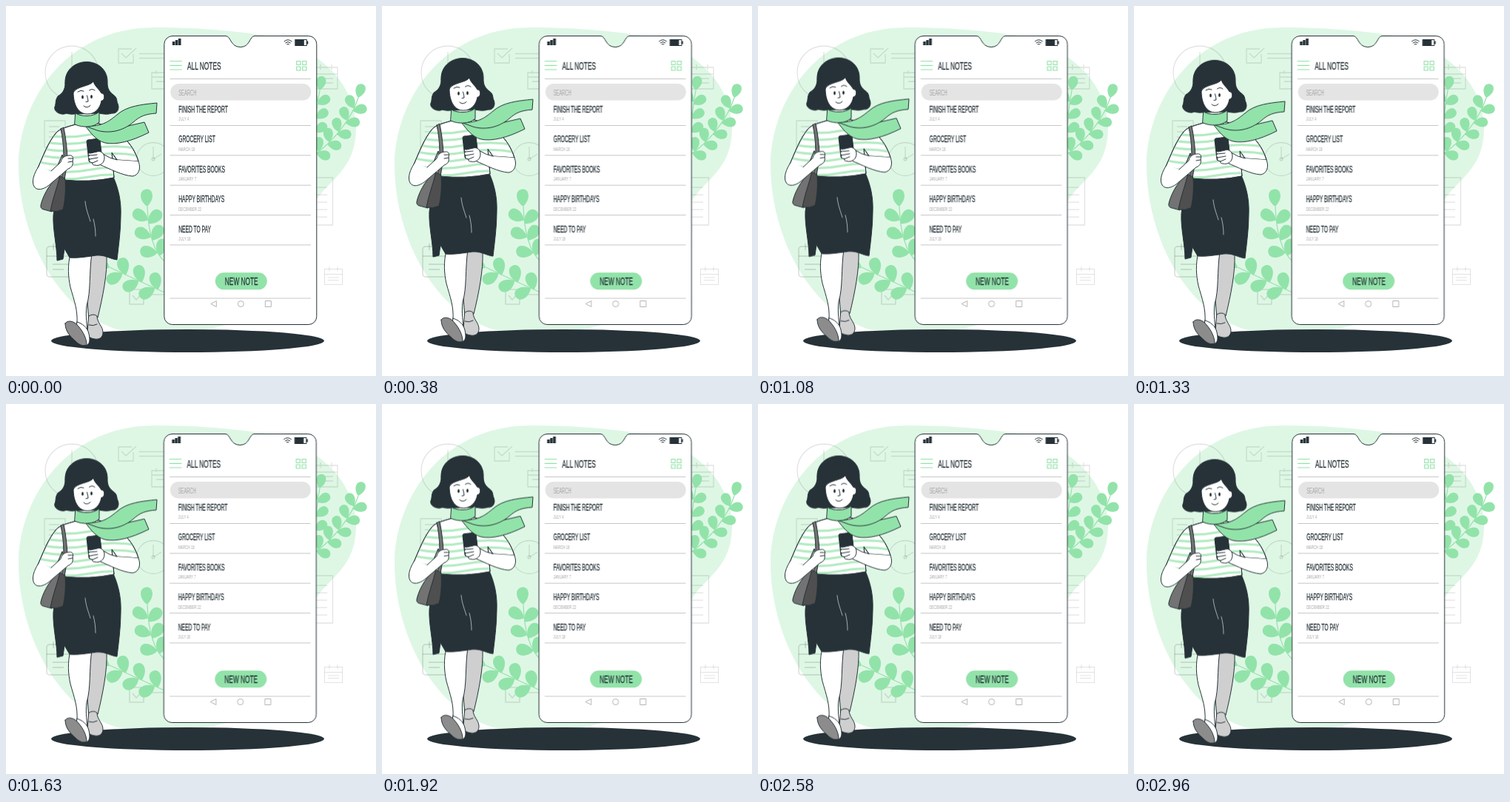
Write an HTML page that moves like this. It is 500 px wide and 500 px high and loops after 3000 ms.

```html
<!DOCTYPE html>
<html lang="en">
<head>
<meta charset="utf-8">
<title>All notes</title>
<style>
html, body { margin: 0; width: 100%; height: 100%; overflow: hidden; background: #fff; }
svg { display: block; width: 100%; height: 100%; }
.icons { fill: none; stroke: #000; stroke-opacity: .11; stroke-width: 1.3; }
.ink { stroke: #263238; stroke-width: 1; stroke-linejoin: round; stroke-linecap: round; fill: #fff; }
.dark { fill: #263238; }
.green { fill: #92e3a9; }
.line { fill: none; }
.stem { fill: none; stroke: #92e3a9; stroke-width: 1.2; }
.rule { stroke: #c7c7c7; }
.labels { font-family: "Liberation Sans", Arial, sans-serif; fill: #263238; stroke: #263238; stroke-width: .3; }
.title { font-size: 12.4px; }
.big { font-size: 15.4px; }
.date { font-size: 8.1px; }
.hint { font-size: 10.8px; }
.date, .hint { fill: #a6a6a6; stroke: none; }
#phone { animation: sway 1.5s linear infinite; }
#woman { animation: bob 1.5s linear infinite; }
@keyframes sway { 50% { transform: translateX(-3px); } }
@keyframes bob { 50% { transform: translateY(-9.7px); } }
</style>
</head>
<body>
<svg viewBox="0 0 500 500">
  <defs>
    <path id="leaf" d="M0 0C-5-3-10-11-8-18C-6-25 5-26 7-18C9-11 4-4 0 0Z"/>
    <path id="shirt" d="M94 160C84 163 74 165 68 171C57 184 50 203 43 219L66 225L76 201L78 235Q112 239 146 232L143 198L150 208L179 210C175 197 168 186 160 179C150 171 140 165 126 159Z"/>
    <clipPath id="cloth"><use href="#shirt"/></clipPath>
  </defs>

  <path fill="#def7e5" d="M17 215C17 135 75 30 200 29C260 29 300 33 345 39C405 48 473 95 473 165C473 225 432 235 415 270C390 330 390 400 320 425C270 440 205 450 150 437C65 410 17 305 17 215Z"/>

  <g class="icons">
    <circle cx="89" cy="90" r="36"/>
    <path d="M89 62V90"/>
    <path d="M172 65V77H152V58H170M156 64L162 70L176 57M180 64.500H214M180 70.500H214"/>
    <path d="M214 90H197V112H214M197 96H214M203 87V92M203 102H214"/>
    <path d="M418 83H448V112H418M418 92H448M425 79V86M440 79V86M424 98H442M424 104H442"/>
    <path d="M52 155H80V191H52ZM58 163H72M58 170H68M58 177H72"/>
    <circle cx="199" cy="207" r="22.500"/>
    <circle cx="199" cy="207" r="2"/>
    <path d="M199 190V207L210 200"/>
    <rect x="55" y="325" width="45" height="41" rx="4" stroke-width="2"/>
    <path stroke-width="2" d="M55 338H100M64 321V330M76 321V330M63 349H84M63 356H78"/>
    <path stroke-width="1.700" d="M186 391V403H167V383H184M171 391L176 397L190 382M190 390H214"/>
    <path d="M418 232H441.500V296H418"/>
    <path stroke-dasharray="1.300 8.700" stroke-width="16" d="M426 244.500V290"/>
    <path stroke-width="1" d="M430.500 355.500H454.500V376.500H430.500ZM430.500 362.500H454.500M437 352V358.500M448 352V358.500M435 367H450M435 370.500H450"/>
  </g>

  <ellipse class="dark" cx="245.500" cy="452.500" rx="184.500" ry="15.500"/>

  <g id="plants" class="green"></g>

  <g id="phone">
    <path class="ink" d="M224.800 40.500H297C304 40.500 303 55.500 316.800 55.500C330 55.500 329 40.500 336 40.500H408.800A11 11 0 0 1 419.800 51.500V419.500A11 11 0 0 1 408.800 430.500H224.800A11 11 0 0 1 213.800 419.500V51.500A11 11 0 0 1 224.800 40.500Z"/>
    <path class="dark" d="M224.800 48H228.300V53H224.800ZM228.800 46H232.300V53H228.800ZM232.800 44H236.500V53H232.800Z"/>
    <g fill="none" stroke="#263238">
      <path d="M375.800 48Q381 43.500 386.300 48M377.500 50Q381 47 384.600 50M379.300 52Q381 50.500 382.800 52"/>
      <rect x="390.800" y="45.500" width="15.500" height="8"/>
    </g>
    <path class="dark" d="M391 46H402.800V53H391ZM406 47.500H408.300V51.500H406Z"/>
    <g class="line" stroke="#92e3a9" stroke-width="1.200">
      <path d="M221.300 74.500H237.800M221.300 80.300H237.800M221.300 86H237.800"/>
      <path d="M392.800 74.500h5v5h-5zm8 0h5v5h-5zm-8 7.500h5v5h-5zm8 0h5v5h-5z"/>
    </g>
    <rect x="222.300" y="105" width="190" height="22.500" rx="11.250" fill="#e4e4e4"/>
    <rect class="green" x="282.800" y="360.300" width="70" height="23" rx="11.500"/>
    <g class="line" stroke="#b4b4b4">
      <path d="M276.800 402.500L284.300 398.500V406.500ZM350.300 398.500h8v8h-8z"/>
      <circle cx="317.300" cy="402.500" r="4"/>
    </g>
    <g id="rules" class="rule"></g>
    <g class="labels" transform="translate(233.200 0) scale(.54 1)">
      <text class="big" x="22" y="86">ALL NOTES</text>
      <text class="hint" y="121">SEARCH</text>
      <g id="notes"></g>
      <text class="big" x="116" y="377.500">NEW NOTE</text>
    </g>
  </g>

  <g id="woman" class="ink">
    <!-- legs and shoes -->
    <path fill="#cfcfcf" d="M112 334L136 337C137 362 131 392 124 421H112C109 400 109 370 112 334Z"/>
    <path fill="#cfcfcf" d="M112 419Q118 415 123 419C123 428 131 433 131 441C131 448 126 451 120 450C114 449 110 447 110 442Z"/>
    <path class="line" d="M112 431Q118 433 123 430"/>
    <path d="M87 334C83 352 84 366 87 380C92 398 97 410 96 429L110 443C110 432 107 420 109 405C115 385 112 362 116 334Z"/>
    <path d="M96 427C103 429 110 434 112 443C114 452 113 457 108 459L96 440Z"/>
    <path fill="#8c8c8c" d="M80 429C83 424 92 425 98 433C105 441 109 450 109 458C104 460 99 458 94 453C86 446 80 439 80 429Z"/>

    <!-- skirt -->
    <path class="dark" d="M78 233Q112 238 145 231C152 247 156 264 155 284C155 304 152 325 150 343C141 342 134 336 122 337C109 339 95 341 86 340L79 328L77 342L69 344C69 325 63 302 64 283C66 262 73 249 78 233Z"/>
    <path class="line" stroke="#fff" stroke-width=".6" d="M107 264C108 275 112 284 114 291M118 288C120 295 121 303 121 311"/>

    <!-- shirt -->
    <use href="#shirt"/>
    <path id="stripes" class="line" clip-path="url(#cloth)" stroke="#b2ebc1" stroke-width="3.200"/>
    <use href="#shirt" fill="none"/>

    <!-- bag -->
    <path fill="#737373" d="M74 166L78 164C81 180 83 195 83 210L79 235H75C79 210 79 190 74 166Z"/>
    <path fill="#737373" d="M73 229C63 235 51 252 47 269Q46 274 51 275L62 278L74 244Z"/>
    <path fill="#4f4f4f" d="M73 229L80 234C81 249 80 263 77 275Q69 279 60 277C63 260 69 246 73 229Z"/>

    <!-- left arm -->
    <path d="M44 217C38 226 34 237 38 244C42 250 50 248 57 243L84 220C90 218 91 213 90 209C92 204 89 201 85 202C80 202 75 205 74 211L61 223"/>
    <path class="line" d="M84 206L90 206M84 211L90 210"/>

    <!-- right arm with handset -->
    <path d="M179 210C183 220 179 229 171 230C157 229 140 220 126 214L131 200Q140 206 150 208"/>
    <path class="dark" d="M111 181L125 179Q127 179 127 181L130 207Q130 209 128 209L114 211Q112 211 112 209L109 183Q109 181 111 181Z"/>
    <path d="M112 202Q110 198 114 199L123 197C128 195 133 199 133 205C133 212 127 217 120 215Q116 215 117 212Q111 211 113 207Q110 205 112 202Z"/>
    <path class="line" d="M112 202L123 201M113 207L124 205M117 212L124 209"/>

    <!-- head -->
    <path class="dark" d="M80 104C79 87 93 75.500 109 75.500C125 75.500 138 87 137 104C137 112 140 116 145 120C151 124 149 128 151 132C154 139 150 146 143 145C137 147 131 146 126 145L92 146C85 147 82 144 79 146C72 147 64 142 66 136C68 132 66 128 70 122C76 118 80 114 80 104Z"/>
    <path d="M91 117C95 108 113 109 118 102C120 109 126 112 129 118C134 117 134 128 129 128C127 139 120 146 110 146C98 146 91 134 91 117Z"/>
    <g class="dark" stroke="none">
      <ellipse cx="103.500" cy="123" rx="1.400" ry="2.500"/>
      <ellipse cx="115.500" cy="122.500" rx="1.400" ry="2.500"/>
    </g>
    <path class="line" d="M97 116Q101 113 105 115M112.500 114Q116 111 120 114M109.500 121Q111 126 111 129L108 129.500M105 135Q109 139 114 134.500"/>

    <!-- scarf -->
    <path class="green" d="M107 162C121 166 145 169 161 163L187 157L193 171C169 183 149 188 134 185C122 182 115 172 107 162Z"/>
    <path class="green" d="M107 162C131 164 141 154 150 147C163 135 184 133 204 131L203 145C188 146 181 149 172 157C158 169 139 173 123 168Z"/>
    <path class="green" d="M94 145C102 150 118 150 126 143L126 157C119 164 104 165 93 160Z"/>
  </g>
</svg>
<script>
const el = id => document.getElementById(id);
const svgTag = (name, attrs) => {
  const node = document.createElementNS("http://www.w3.org/2000/svg", name);
  for (const key in attrs) node.setAttribute(key, attrs[key]);
  return el("plants").appendChild(node);
};

// Leaves sit in pairs at equal steps down from the tip, splayed from the stem.
function plant(d, gap, scale) {
  const stem = svgTag("path", { d, class: "stem" });
  const length = stem.getTotalLength();
  const leaf = (at, splay) => {
    const p = stem.getPointAtLength(at), q = stem.getPointAtLength(at - 1);
    const turn = Math.atan2(p.x - q.x, q.y - p.y) * 180 / Math.PI + splay;
    svgTag("use", {
      href: "#leaf",
      transform: `translate(${p.x} ${p.y}) rotate(${turn}) scale(${scale})`
    });
  };
  leaf(length, 0);
  for (let at = length - gap * .8; at > 1; at -= gap) {
    leaf(at, -52);
    leaf(at - 5 * scale, 52);
  }
}
plant("M214 345C198 330 192 302 191 271", 23, 1);
plant("M214 387C190 376 165 365 140 353", 24, 1);
plant("M418 200C445 181 468 150 476 124", 19, .82);
plant("M417 180C418 155 420 135 424 114", 19, .82);

let waves = "";
for (let y = 171; y < 234; y += 9.5) waves += `M36 ${y}q40 10 76 3t72 1`;
el("stripes").setAttribute("d", waves);

const rule = y => `<path d="M221.500 ${y}H412"/>`;
const notes = [
  ["FINISH THE REPORT", "JULY 4"],
  ["GROCERY LIST", "MARCH 16"],
  ["FAVORITES BOOKS", "JANUARY 7"],
  ["HAPPY BIRTHDAYS", "DECEMBER 22"],
  ["NEED TO PAY", "JULY 16"]
];
el("rules").innerHTML = rule(98.5) + rule(395) + notes.map((_, i) => rule(161.5 + 40.35 * i)).join("");
el("notes").innerHTML = notes.map(([title, date], i) => {
  const y = 143.8 + 40.55 * i;
  return `<text class="title" y="${y}">${title}</text><text class="date" y="${y + 11.2}">${date}</text>`;
}).join("");
</script>
</body>
</html>
```
